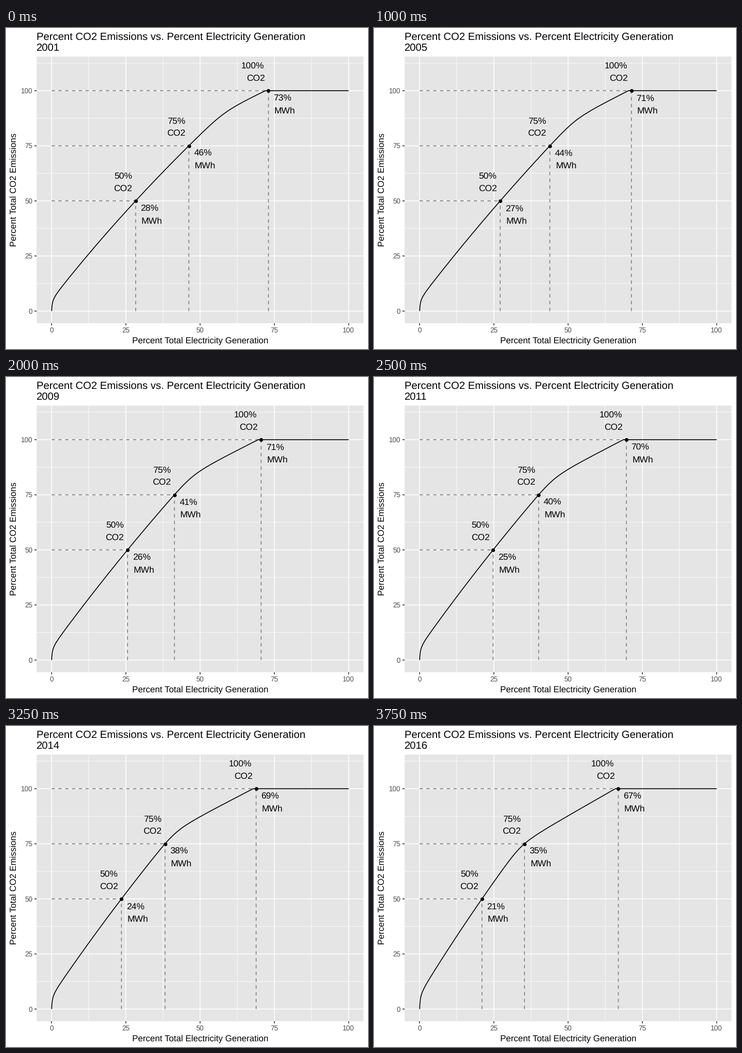
A matplotlib script for the animation above (4000 ms loop, 700x620 px).

```python
import numpy as np
import matplotlib.pyplot as plt
from matplotlib.animation import FuncAnimation
from matplotlib.patches import Rectangle

W, H, DPI = 700, 620, 100
PX = 72 / DPI
LINE = 1.64 * PX

plt.rcParams.update({
    "font.family": "Liberation Sans",
    "path.snap": False,
    "text.hinting": "none",
    "lines.solid_capstyle": "butt",
    "lines.dash_capstyle": "butt",
})

FIRST, COUNT = 2001, 16

# Key years of each quantity; the years between are linear.
SHARE = {
    50: {2001: 28.3, 2003: 27.9, 2007: 26.4, 2014: 23.52, 2016: 21.0},
    75: {2001: 46.2, 2003: 44.8, 2007: 42.9, 2009: 41.35, 2014: 38.2,
         2016: 35.3},
    100: {2001: 73.0, 2003: 71.0, 2007: 71.6, 2008: 72.4, 2009: 70.55,
          2010: 71.4, 2011: 69.6, 2012: 70.1, 2014: 68.85, 2016: 66.9},
}
KNEE = {2001: 91.5, 2007: 86.5, 2014: 82, 2016: 75.7}
RISE = np.linspace(0, 100, 240)


def at_year(keys, year):
    return float(np.interp(year, list(keys), list(keys.values())))


def softplus(z, width):
    return width * np.logaddexp(0, z / width)


def emission_curve(year):
    """Generation share over RISE: a parabola that bends at the knee,
    fitted through the dots, with a soft steep start."""
    knee = at_year(KNEE, year)

    def basis(y):
        y = np.asarray(y, float)
        return np.stack([y**0, y, y**2, softplus(y - knee, 2.5)], axis=-1)

    fixed = [-2.9, at_year(SHARE[50], year), at_year(SHARE[75], year),
             at_year(SHARE[100], year) - 1]
    weights = np.linalg.solve(basis([0, 50, 75, 100]), fixed)
    return softplus(basis(RISE) @ weights, 0.9)


def sx(x):
    return 88.1 + 5.745 * np.asarray(x)


def sy(y):
    return 546.7 - 4.256 * np.asarray(y)


fig = plt.figure(figsize=(W / DPI, H / DPI), dpi=DPI, facecolor="white")
ax = fig.add_axes([0, 0, 1, 1])
ax.set_xlim(0, W)
ax.set_ylim(H, 0)
ax.axis("off")


def label(x, y, s, size, color="black", ha="center", **kw):
    return ax.text(x, y, s, fontsize=size * PX, color=color, ha=ha,
                   va="baseline", **kw)


L, R, T, B = 59.3, 691.3, 55.2, 570.2
ax.add_patch(Rectangle((L, T), R - L, B - T, fc="#e5e5e5", ec="none", zorder=0))


def grid(values, lw, horizontal):
    for v in values:
        if horizontal:
            ax.plot([L, R], [sy(v)] * 2, color="white", lw=lw, zorder=1)
        else:
            ax.plot([sx(v)] * 2, [T, B], color="white", lw=lw, zorder=1)


major = np.arange(0, 101, 25)
grid(np.arange(12.5, 113, 25), LINE / 2, True)
grid(np.arange(12.5, 100, 25), LINE / 2, False)
grid(major, LINE, True)
grid(major, LINE, False)

for v in major:
    ax.plot([sx(v)] * 2, [B, B + 4.2], color="#333333", lw=LINE)
    ax.plot([L - 4.2, L], [sy(v)] * 2, color="#333333", lw=LINE)
    label(sx(v), 588.3, str(v), 13.5, "#4d4d4d")
    label(51.3, sy(v) + 4.7, str(v), 13.5, "#4d4d4d", "right")

label(59.2, 23.2, "Percent CO2 Emissions vs. Percent Electricity Generation",
      20.3, ha="left")
year_text = label(59.2, 45.2, "", 20.3, ha="left")
label(375.3, 608, "Percent Total Electricity Generation", 16.9)
label(20.3, 312.8, "Percent Total CO2 Emissions", 16.9,
      rotation=90, rotation_mode="anchor")


class Marker:
    """Dot with its dashed guides and four words around it."""

    def __init__(self, level):
        self.level, self.y = level, float(sy(level))
        dash = dict(color="#7f7f7f", lw=LINE, ls=(0, (4, 4)), zorder=2)
        self.across, = ax.plot([], [], **dash)
        self.down, = ax.plot([], [], **dash)
        self.dot, = ax.plot([], [], "o", color="black", ms=7.1 * PX, mew=0,
                            zorder=4)
        first = -30.3 if level == 100 else -24.2
        self.words = []
        for dx, dy, s in ((first, -42.4, f"{level}%"), (-24.6, -18.2, "CO2"),
                          (27, 19.7, ""), (31.5, 43.9, "MWh")):
            text = label(0, self.y + dy, s, 17.4, zorder=5)
            self.words.append((text, dx))

    def move(self, year):
        share = at_year(SHARE[self.level], year)
        x = float(sx(share))
        self.across.set_data([sx(0), x], [self.y] * 2)
        self.down.set_data([x, x], [sy(0), self.y])
        self.dot.set_data([x], [self.y])
        for text, dx in self.words:
            text.set_x(x + dx)
        self.words[2][0].set_text(f"{round(share)}%")


curve, = ax.plot([], [], color="black", lw=LINE, zorder=3)
markers = [Marker(level) for level in SHARE]


def draw(i):
    year = FIRST + i
    xs = emission_curve(year)
    curve.set_data(sx(np.append(xs, 100)), sy(np.append(RISE, 100)))
    for mark in markers:
        mark.move(year)
    year_text.set_text(str(year))
    return []


anim = FuncAnimation(fig, draw, frames=COUNT, interval=250,
                     init_func=lambda: draw(0), repeat=True, repeat_delay=0)
plt.show()
```
